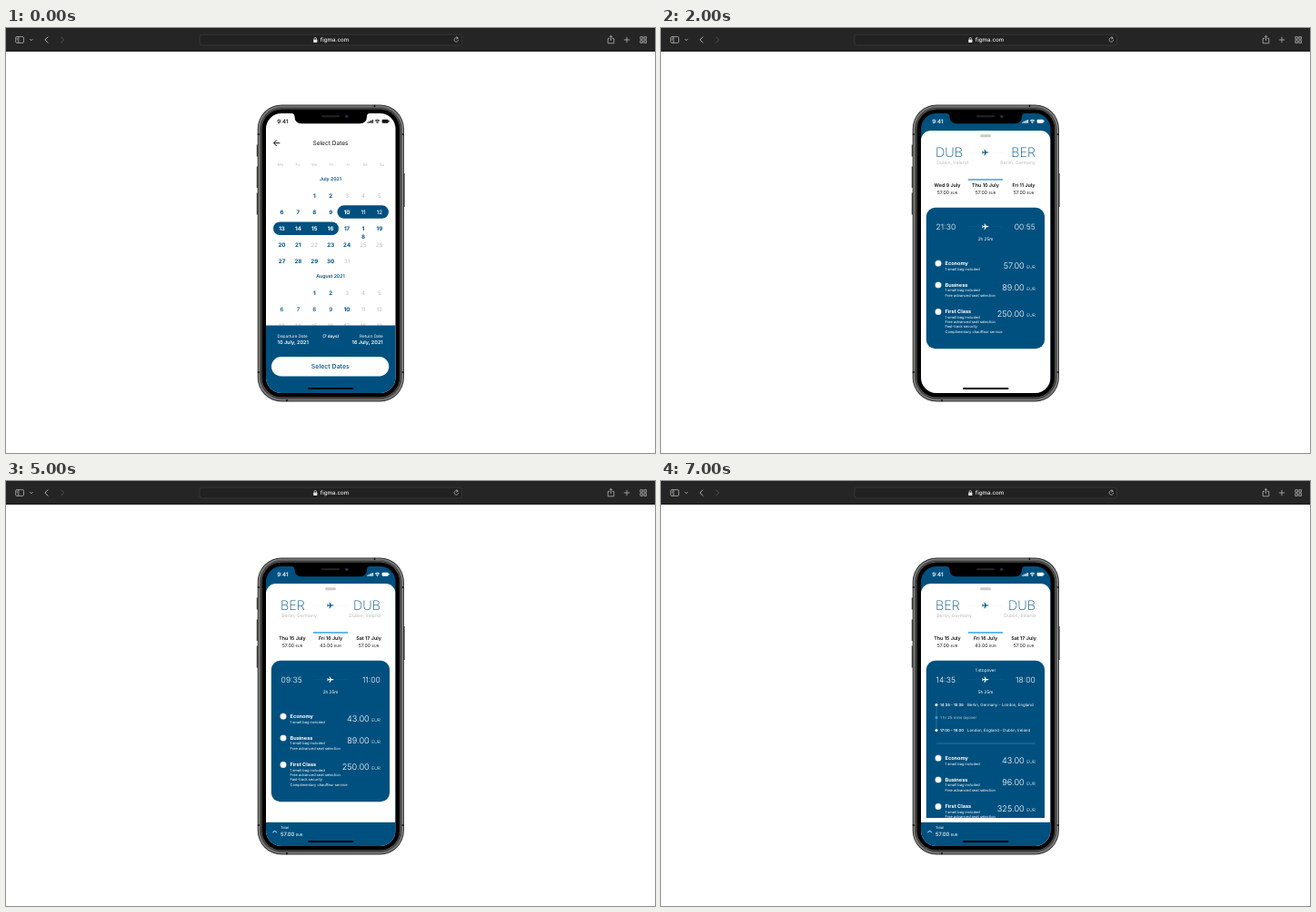
Write an HTML page that moves like this. It is 714 px wide and 468 px high and loops after 8 s.

```html
<!DOCTYPE html>
<html lang="en">
<head>
<meta charset="utf-8">
<title>Flight booking</title>
<style>
  html, body { margin: 0; width: 100%; height: 100%; overflow: hidden; background: #fff; }
  svg { display: block; width: 714px; height: 468px; font-family: Inter, Roboto, sans-serif; }
  text { white-space: pre; text-rendering: geometricPrecision; }
</style>
</head>
<body>
<svg viewBox="0 0 714 468">
  <defs>
    <clipPath id="screenClip"><rect x="286" y="94" width="142.5" height="308" rx="17"/></clipPath>
    <clipPath id="listClip"><rect x="286" y="190" width="143" height="181"/></clipPath>
    <path id="plane" d="M3.4 0C3.4-.5 2.8-.6 2.2-.6H1L-.7-3.2h-.8L-.7-.6h-1.6l-.7-.9h-.7l.4 1.5-.4 1.5h.7l.7-.9h1.6l-.8 2.6h.8L1 .6h1.2C2.8.6 3.4.5 3.4 0Z"/>
  </defs>

  <rect width="714" height="26" fill="#252525"/>
  <rect y="25" width="714" height="1" fill="#161616"/>
  <rect x="213" y="7.2" width="288.5" height="11.8" rx="2.5" fill="#212121" stroke="#3e3e3e" stroke-width=".7"/>
  <g fill="none" stroke="#b5b5b5" stroke-width=".8">
    <rect x="10.7" y="9.6" width="8.8" height="6.8" rx="1.2"/>
    <path d="M13.8 9.6v6.8M11.7 11.3h1.1M11.7 12.8h1.1"/>
    <path d="M26.3 12.2l1.500 1.500 1.500-1.500M46.2 9.6l-3.3 3.4 3.3 3.4" stroke-width="1"/>
    <path d="M60.4 9.6l3.3 3.4-3.3 3.4" stroke="#5c5c5c"/>
    <path d="M497.300 11.6a2.300 2.300 0 1 0 .4 1.500M495.700 9.300l1.700 2-2.200 .8"/>
    <path d="M664 11.6h-1.8v5.2h6.6v-5.2H667M665.5 14V8.5M663.7 10.2l1.8-1.8 1.8 1.8"/>
    <path d="M683 9.8v6.4M679.8 13h6.4"/>
    <path d="M697.8 9.7h2.6v2.6h-2.6zM701.9 9.7h2.6v2.6h-2.6zM697.8 13.8h2.6v2.6h-2.6zM701.9 13.8h2.6v2.6h-2.6z"/>
    <path d="M339.1 13v-1.2a1.2 1.2 0 0 1 2.4 0V13" stroke="#e4e4e4"/>
  </g>
  <rect x="338.2" y="12.7" width="4.2" height="3.3" rx=".6" fill="#e4e4e4"/>
  <text x="345.8" y="15.2" font-size="6.2" font-weight="500" fill="#f0f0f0">figma.com</text>

  <path d="M276.4 128.5v13M276.4 152.5v23.5M276.4 181.5v24M438 160v37" stroke="#444" stroke-width="1.300"/>
  <g id="shell"></g>
  <path d="M276.8 117h2.2M435.6 117h2.2M276.8 379h2.2M435.6 379h2.2M405.5 84.8V87M309 409v2.2" stroke="#111" stroke-width="1.500"/>

  <g id="screen" clip-path="url(#screenClip)"></g>

  <path d="M312 93.5h90q-4.700 0-5 3.500v.5q0 7.700-8 7.700h-63.500q-8 0-8-7.700V97q-.3-3.500-5.500-3.500Z" fill="#000"/>
  <rect x="347" y="96.300" width="20" height="2" rx="1" fill="#242424"/>
  <circle cx="374.800" cy="97.300" r="1.900" fill="#1d2430"/>
  <circle cx="374.800" cy="97.300" r=".8" fill="#36425c"/>
</svg>

<script>
const BLUE = '#00507f', WHITE = '#fff', INK = '#111', GREY = '#bcbcbc', SKY = '#36a3ea';

const text = (x, y, str, size, weight = 400, fill = WHITE, anchor = 'start') =>
  `<text x="${x}" y="${y}" font-size="${size}" font-weight="${weight}" fill="${fill}" text-anchor="${anchor}">${str}</text>`;
const mid = (x, y, str, size, weight, fill) => text(x, y, str, size, weight, fill, 'middle');
const right = (x, y, str, size, weight, fill) => text(x, y, str, size, weight, fill, 'end');
const rect = (x, y, w, h, rx = 0, fill = BLUE, extra = '') =>
  `<rect x="${x}" y="${y}" width="${w}" height="${h}" rx="${rx}" fill="${fill}" ${extra}/>`;
const dot = (x, y, r, fill) => `<circle cx="${x}" cy="${y}" r="${r}" fill="${fill}"/>`;
const line = (d, color, width) => `<path d="${d}" fill="none" stroke="${color}" stroke-width="${width}"/>`;
const euro = (amount, size) => `${amount} <tspan font-size="${size}">EUR</tspan>`;
const card = (y, h) => rect(291.8, y, 130.3, h, 10);

// Nested metal rings, from the outer edge to the black bezel
const shell = [[0, '#262626'], [.9, '#8c8c8a'], [2, '#5e5e5d'], [3.4, '#2b2b2b'], [4.2, '#6c6c6b'], [4.8, '#000']]
  .map(([inset, fill]) =>
    rect(276.7 + inset, 84.6 + inset, 161.200 - 2 * inset, 326.800 - 2 * inset, 26.5 - inset, fill)).join('');

const statusBar = color =>
  text(298.2, 105, '9:41', 6.1, 600, color) +
  [0, 1, 2, 3].map(i => rect(397.3 + i * 1.8, 103.4 - i * .8, 1.3, 1.4 + i * .8, .3, color)).join('') +
  line('M405.9 102.200q2.600-2.400 5.200 0M407 103.300q1.500-1.300 3 0', color, 1) + dot(408.5, 104.3, .7, color) +
  rect(413.6, 100.8, 7.2, 3.9, 1.1, color) + rect(421.1, 102, .5, 1.500, .2, color);
const homeBar = () => rect(332, 396, 50.5, 2, 1, '#000');

function calendar() {
  const muted = { 0: [3, 4, 5], 3: [22, 25, 26], 4: [31], 5: [3, 4, 5], 6: [11, 12], 7: [13, 14, 15, 16, 17, 18, 19] };
  const chosen = day => day >= 10 && day <= 16;
  const rowY = [187, 204.8, 223.2, 241.3, 258.8, 294, 311.8, 329.8];
  const firstDay = [-1, 6, 13, 20, 27, -1, 6, 13];
  let out = rect(286, 94, 143, 308, 0, WHITE) + statusBar(INK) +
    line('M301.300 126.700h-6.600M297.700 123.500l-3.200 3.200 3.200 3.200', INK, 1) +
    mid(357, 129.2, 'Select Dates', 6.6, 400, INK) +
    mid(357, 168.2, 'July 2021', 5.2, 600, BLUE) + mid(357, 274.8, 'August 2021', 5.2, 600, BLUE) +
    rect(364.5, 195.3, 56.5, 14.5, 7.25) + rect(294, 213.5, 72, 14.5, 7.25);
  ['Mo', 'Tu', 'We', 'Th', 'Fr', 'Sa', 'Su'].forEach((name, i) =>
    out += mid(302 + i * 18.6, 151.5, name, 4.2, 400, GREY));
  rowY.forEach((y, row) => {
    for (let col = 0; col < 7; col++) {
      const day = firstDay[row] + col, x = 303.5 + col * 17.9;
      if (day < 1 || day > 31) continue;
      const july = row < 5, isMuted = (muted[row] || []).includes(day);
      const fill = july && chosen(day) ? WHITE : isMuted ? GREY : BLUE;
      const weight = isMuted ? 400 : july && (day === 11 || day === 12) ? 500 : row === 6 && day < 10 ? 500 : 700;
      if (july && day === 18) out += mid(x, y, 1, 6.2, 700, fill) + mid(x, y + 9.2, 8, 6.2, 700, fill);
      else out += mid(x, y, day, 6.2, weight, fill);
    }
  });
  return out + rect(286, 327.5, 143, 75) +
    text(298.6, 341, 'Departure Date', 4.6) + text(298.6, 348.2, '10 July, 2021', 5.5, 600) +
    mid(357.2, 341, '(7 days)', 4.6, 600) +
    right(414.7, 341, 'Return Date', 4.6) + right(414.7, 348.2, '16 July, 2021', 5.5, 600) +
    rect(292, 362, 129.3, 21.5, 10.75, WHITE) + mid(356.8, 375.3, 'Select Dates', 7, 500, BLUE) + homeBar();
}

const route = (y, fill) => line(`M338 ${y}h13M363 ${y}h13`, fill === WHITE ? '#1b6290' : '#e8eef3', .4) +
  `<use href="#plane" x="357" y="${y}" fill="${fill}"/>`;

function sheet([from, fromCity, to, toCity], dates, content) {
  let out = rect(286, 94, 143, 308) + statusBar(WHITE) + rect(286, 113, 142.5, 310, 11, WHITE) +
    rect(351, 117.2, 12, 3, 1.5, '#cbcbcb') +
    text(302, 142, from, 14.4, 200, BLUE) + right(412, 142, to, 14.4, 200, BLUE) + route(137, BLUE) +
    text(303.2, 150, fromCity, 5.1, 400, '#bdbdbd') + right(411.8, 150, toCity, 5.1, 400, '#bdbdbd') +
    rect(338, 166.2, 38, 1.5, 0, SKY);
  dates.forEach(([date, price], i) => {
    const x = 315 + i * 42;
    out += mid(x, 175.2, date, 5.4, 600, INK) + mid(x, 183.2, euro(price, 3.9), 5.2, 400, INK);
  });
  return out + content + homeBar();
}

const times = (y, start, end, duration) =>
  text(302.6, y, start, 8.6, 300) + right(411.8, y, end, 8.6, 300) + route(y - 3.3, WHITE) + mid(357, y + 11.5, duration, 4.7);
const stopover = y => mid(357, y, '1 stopover', 4.7);
const cheapest = (y, price) =>
  mid(357, y, `Cheapest fare <tspan font-size="7.7" font-weight="300">${price} </tspan><tspan font-size="4.7" font-weight="400">EUR</tspan>`, 5.4, 500);
const directOnly = y => rect(292.5, y - 4.8, 6.2, 6.2, .8, WHITE, 'stroke="#d0d0d0" stroke-width=".5"') +
  text(302, y, 'Direct flights only', 5.2, 400, INK);

function fares(prices, shift = 0, picked = -1) {
  const perks = [
    ['1 small bag included'],
    ['1 small bag included', 'Free advanced seat selection'],
    ['1 small bag included', 'Free advanced seat selection', 'Fast-track security', 'Complimentary chauffeur service']
  ];
  return ['Economy', 'Business', 'First Class'].map((name, i) => {
    const y = [259.2, 283, 312.4][i] + shift;
    return dot(305, y, 3.6, '#b5b5b5') + dot(305, y, 3, WHITE) + (picked === i ? dot(305, y, 2, '#777') : '') +
      text(312.5, y + 1.5, name, 5.6, 700) +
      perks[i].map((perk, k) => text(312.5, y + 7.4 + k * 5.3, perk, 4)).join('') +
      right(411.8, y + 5.6, euro(prices[i], 4.8), 9.2, 300);
  }).join('');
}

const totalBar = (total, button) => rect(286, 375.8, 143, 27) +
  line('M293.300 387.300l2.300-2.300 2.300 2.300', WHITE, .9) +
  text(302, 383, 'Total', 3.9) + text(302, 390.5, euro(total, 3.8), 5.9, 500) +
  (button ? rect(337, 378.6, 86.2, 14.2, 7.1, WHITE) + mid(379.7, 388, 'Select Flight', 6.2, 500, BLUE) : '');

const DUB = ['DUB', 'Dublin, Ireland'], BER = ['BER', 'Berlin, Germany'];
const outbound = content => sheet([...DUB, ...BER],
  [['Wed 9 July', '57.00'], ['Thu 10 July', '57.00'], ['Fri 11 July', '57.00']], content);
const inbound = content => sheet([...BER, ...DUB],
  [['Thu 15 July', '57.00'], ['Fri 16 July', '43.00'], ['Sat 17 July', '57.00']], content);

const outFares = picked => card(197.7, 155.5) +
  times(222, '21:30', '00:55', '2h 25m') + fares(['57.00', '89.00', '250.00'], 0, picked);
const backFares = picked => card(197.7, 155.5) +
  times(222, '09:35', '11:00', '2h 25m') + fares(['43.00', '89.00', '250.00'], 0, picked);

function stopoverFares() {
  const legs = [['14:35 - 15:35', 'Berlin, Germany - London, England'], null, ['17:00 - 18:00', 'London, England - Dublin, Ireland']];
  return '<g clip-path="url(#listClip)">' + card(197.7, 200) + stopover(209.6) +
    times(222, '14:35', '18:00', '5h 25m') + line('M303 246.500v28', '#4b87ab', .6) +
    legs.map((leg, i) => {
      const y = 246.4 + i * 14;
      return dot(303, y, 1.5, leg ? WHITE : SKY) + (leg
        ? text(307, y + 1.5, leg[0], 4.15, 600) + text(337, y + 1.5, leg[1], 4.4)
        : text(307, y + 1.5, '1 hr 25 mins layover', 4.3, 400, '#b4cddd'));
    }).join('') +
    line('M303 289h108.500', '#5b90b0', .5) + fares(['43.00', '96.00', '325.00'], 46) + '</g>';
}

const screens = [
  calendar(),
  outbound(card(197.7, 69) + times(222, '21:30', '00:55', '2h 25m') + cheapest(251, '57.00') + directOnly(281.4)),
  outbound(outFares()),
  outbound(outFares(0) + totalBar('57.00', true)),
  inbound(card(197.7, 66.5) + times(220, '09:35', '11:00', '2h 25m') + cheapest(248.2, '43.00') +
    card(270.8, 66.5) + stopover(280.6) + times(293.2, '14:35', '18:00', '5h 25m') +
    cheapest(319.8, '57.00') + directOnly(352.3) + totalBar('57.00')),
  inbound(backFares() + totalBar('57.00')),
  inbound(backFares(0) + totalBar('100.00', true)),
  inbound(stopoverFares() + totalBar('57.00'))
];

document.getElementById('shell').innerHTML = shell;
const screen = document.getElementById('screen');
let shown = -1;
function tick() {
  const index = Math.floor(performance.now() % 8000 / 1000);
  if (index !== shown) screen.innerHTML = screens[shown = index];
  requestAnimationFrame(tick);
}
tick();
</script>
</body>
</html>
```
